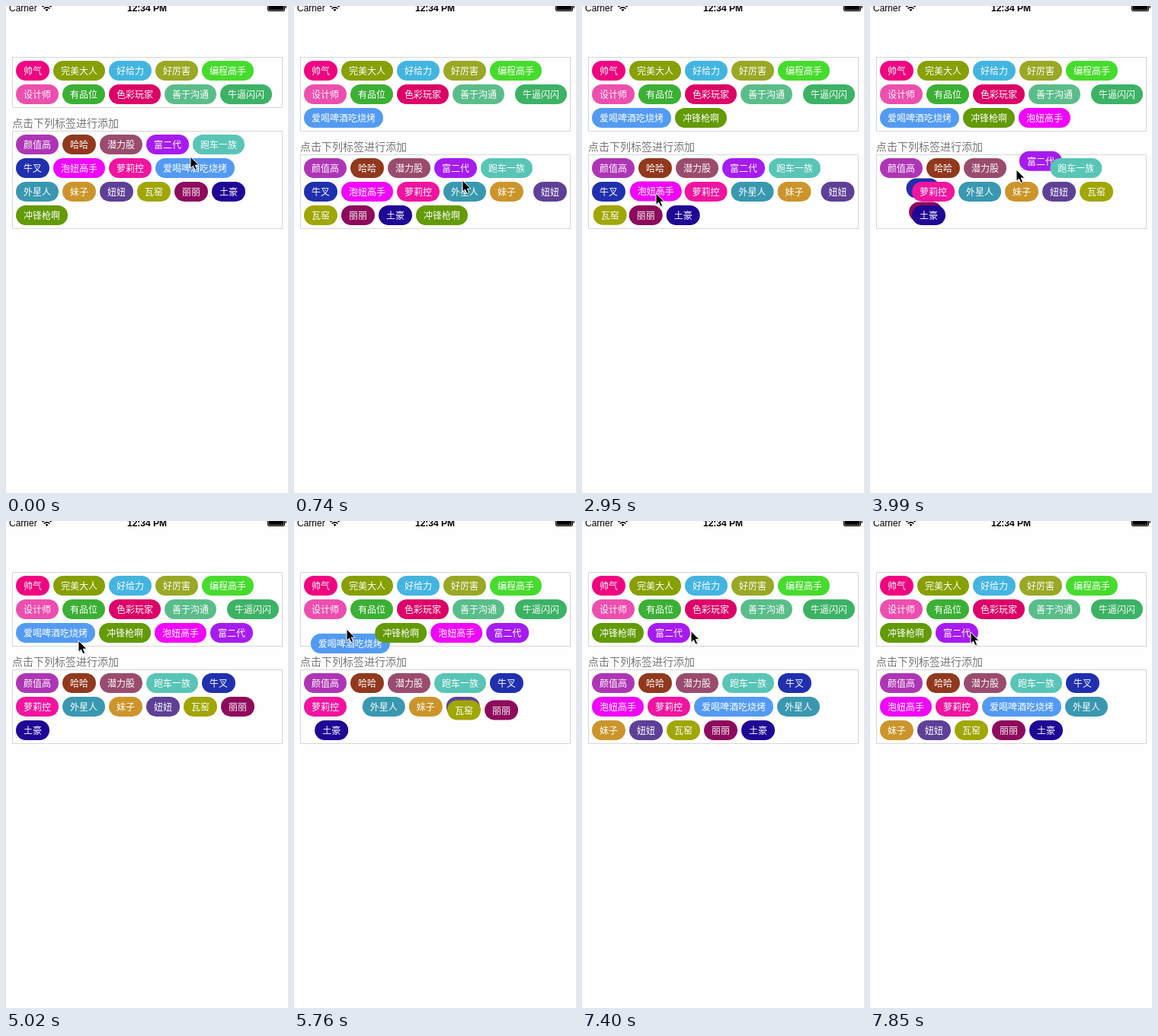
Animation of 370 by 640 pixels, one loop 8000 ms. Source, as an HTML page:

```html
<!DOCTYPE html>
<html lang="zh">
<head>
<meta charset="utf-8">
<title>Tag picker</title>
<style>
  html, body { margin: 0; width: 100%; height: 100%; overflow: hidden; background: #fefefe; }
  svg { display: block; width: 370px; height: 640px; }
  .tag text { font: 12px "Noto Sans CJK SC", "Noto Sans CJK", sans-serif; fill: #fff; }
  .hint { font: 14px "Noto Sans CJK SC", "Noto Sans CJK", sans-serif; fill: #777; }
  .status { font: 12px "Liberation Sans", Arial, sans-serif; fill: #000; }
  .bold { font-weight: bold; }
  .box { fill: none; stroke: #d6d6d6; }
</style>
</head>
<body>
<svg viewBox="0 0 370 640" xmlns="http://www.w3.org/2000/svg">
  <rect width="370" height="640" fill="#fefefe"/>
  <text class="status" x="4" y="7">Carrier</text>
  <g fill="none" stroke="#000" stroke-width="1.7">
    <path d="M47.5 1.2a8.6 8.6 0 0 1 12 0M49.6 3.5a5.6 5.6 0 0 1 7.8 0"/>
    <path d="M53.5 7l-2-2.1a2.9 2.9 0 0 1 4 0z" fill="#000" stroke="none"/>
  </g>
  <text class="status bold" x="185" y="7" text-anchor="middle">12:34 PM</text>
  <rect x="343.5" y="-3.5" width="22" height="10" rx="1.5" fill="none" stroke="#000"/>
  <rect x="344.5" y="-2" width="20" height="7.5"/>
  <rect x="366.5" y="0" width="1.2" height="3"/>
  <rect class="box" id="topBox" x="8.5" width="354"/>
  <rect class="box" id="lowBox" x="8.5" width="354"/>
  <text class="hint" id="hint" x="8">点击下列标签进行添加</text>
  <g id="tags"></g>
  <g id="cursor">
    <path d="M1 1.5V16.500L4.500 13.300L7 18.800L9.700 17.600L7.300 12.300H12z" fill="#000" opacity=".2"/>
    <path d="M0 0V15.300L3.500 12.100L5.900 17.600L8.700 16.400L6.300 11.100H11z"
          fill="#000" stroke="#fff" stroke-width="1" stroke-linejoin="round"/>
  </g>
</svg>
<script>
const LOOP = 8000, STEP = 148, LAST_STEP = 53, MOVE = 300;
const LEFT = 13, RIGHT = 358, GAP = 5, TAG_H = 26, PITCH = TAG_H + GAP, TOP = 67, HINT_H = 30;

const chosen = [
  ['帅气', '#f0047f'], ['完美大人', '#86a000'], ['好给力', '#43b5e0'], ['好厉害', '#9aa825'],
  ['编程高手', '#47db2d'], ['设计师', '#ec4fae'], ['有品位', '#3bb035'], ['色彩玩家', '#dc0067'],
  ['善于沟通', '#5abd89'], ['牛逼闪闪', '#3cb265']
];
const offered = [
  ['颜值高', '#ae35b5'], ['哈哈', '#91381e'], ['潜力股', '#9a4c6e'], ['富二代', '#a61bf0'],
  ['跑车一族', '#59c5b6'], ['牛叉', '#202fad'], ['泡妞高手', '#f006fa'], ['萝莉控', '#f0149f'],
  ['爱喝啤酒吃烧烤', '#539bf2'], ['外星人', '#3998b0'], ['妹子', '#cc952b'], ['妞妞', '#5e4097'],
  ['瓦窑', '#a0a602'], ['丽丽', '#8e0a5c'], ['土豪', '#1f0695'], ['冲锋枪啊', '#639a05']
];
const clicks = [
  [180, '爱喝啤酒吃烧烤'], [2330, '冲锋枪啊'], [2946, '泡妞高手'],
  [3925, '富二代'], [5700, '爱喝啤酒吃烧烤'], [7060, '泡妞高手']
];
// time, x, y of the pointer tip
const path = [
  [0, 242, 198], [148, 241, 206], [444, 238, 212], [740, 221, 229], [1184, 171, 150],
  [1332, 165, 123], [2072, 171, 279], [2516, 171, 279], [2812, 100, 248], [2960, 97, 246],
  [3256, 97, 246], [3404, 106, 243], [3848, 192, 215], [4292, 192, 215], [4588, 196, 215],
  [4736, 180, 202], [5032, 95, 157], [5328, 74, 146], [5476, 69, 142], [6364, 69, 142],
  [6512, 133, 143], [6660, 150, 142], [7252, 150, 142], [7548, 136, 147], [7844, 132, 146]
];

const $ = id => document.getElementById(id);
const lerp = (a, b, p) => a + (b - a) * p;
const clamp = v => Math.max(0, Math.min(1, v));
const ease = p => p * p * (3 - 2 * p);
const tagWidth = name => name.length * 12 + 20;

// Places names in rows below boxTop and returns the lower edge of the box.
function flow(names, boxTop, spots) {
  let x = LEFT, y = boxTop + GAP, prev = null;
  for (const name of names) {
    const w = tagWidth(name);
    if (x + w > RIGHT) {
      const rest = RIGHT - (x - GAP);
      if (rest < 10) spots[prev].x += rest;
      x = LEFT;
      y += PITCH;
    }
    spots[name] = { x, y };
    x += w + GAP;
    prev = name;
  }
  return y + TAG_H + GAP;
}

function layout(picked) {
  const spots = {};
  const topEnd = flow(picked, TOP, spots);
  const lowStart = topEnd + HINT_H;
  const rest = offered.map(t => t[0]).filter(n => !picked.includes(n));
  const lowEnd = flow(rest, lowStart, spots);
  return { spots, topEnd, lowStart, lowEnd };
}

let picked = chosen.map(t => t[0]);
const states = [layout(picked)];
for (const [, name] of clicks) {
  picked = picked.includes(name) ? picked.filter(n => n !== name) : [...picked, name];
  states.push(layout(picked));
}

function make(tag, attrs, parent) {
  const el = document.createElementNS('http://www.w3.org/2000/svg', tag);
  for (const k in attrs) el.setAttribute(k, attrs[k]);
  return parent.appendChild(el);
}

const tags = [...chosen, ...offered].map(([name, color]) => {
  const g = make('g', { class: 'tag' }, $('tags'));
  make('rect', { width: tagWidth(name), height: TAG_H, rx: 13, fill: color }, g);
  make('text', { x: 10, y: 18 }, g).textContent = name;
  return { name, g };
});

const moveTo = (el, x, y) => el.setAttribute('transform', `translate(${x.toFixed(2)} ${y.toFixed(2)})`);

function setBox(el, top, end) {
  el.setAttribute('y', top + 0.5);
  el.setAttribute('height', end - top - 1);
}

function pointer(t) {
  const i = path.findIndex(k => k[0] > t);
  if (i < 0) return path[path.length - 1].slice(1);
  const a = path[i - 1], b = path[i], p = (t - a[0]) / (b[0] - a[0]);
  return [lerp(a[1], b[1], p), lerp(a[2], b[2], p)];
}

function draw(time) {
  const t = Math.min(LAST_STEP, Math.floor((time + 20) / STEP)) * STEP;
  const n = clicks.filter(c => c[0] <= t).length;
  const to = states[n], from = states[Math.max(0, n - 1)];
  const p = n ? ease(clamp((t - clicks[n - 1][0]) / MOVE)) : 1;
  const mix = key => lerp(from[key], to[key], p);

  setBox($('topBox'), TOP, mix('topEnd'));
  setBox($('lowBox'), mix('lowStart'), mix('lowEnd'));
  $('hint').setAttribute('y', mix('lowStart') - 5);
  for (const { name, g } of tags) {
    const a = from.spots[name], b = to.spots[name];
    moveTo(g, lerp(a.x, b.x, p), lerp(a.y, b.y, p));
  }
  moveTo($('cursor'), ...pointer(t));
}

const start = performance.now();
function tick() {
  draw((performance.now() - start) % LOOP);
  requestAnimationFrame(tick);
}
tick();
</script>
</body>
</html>
```
